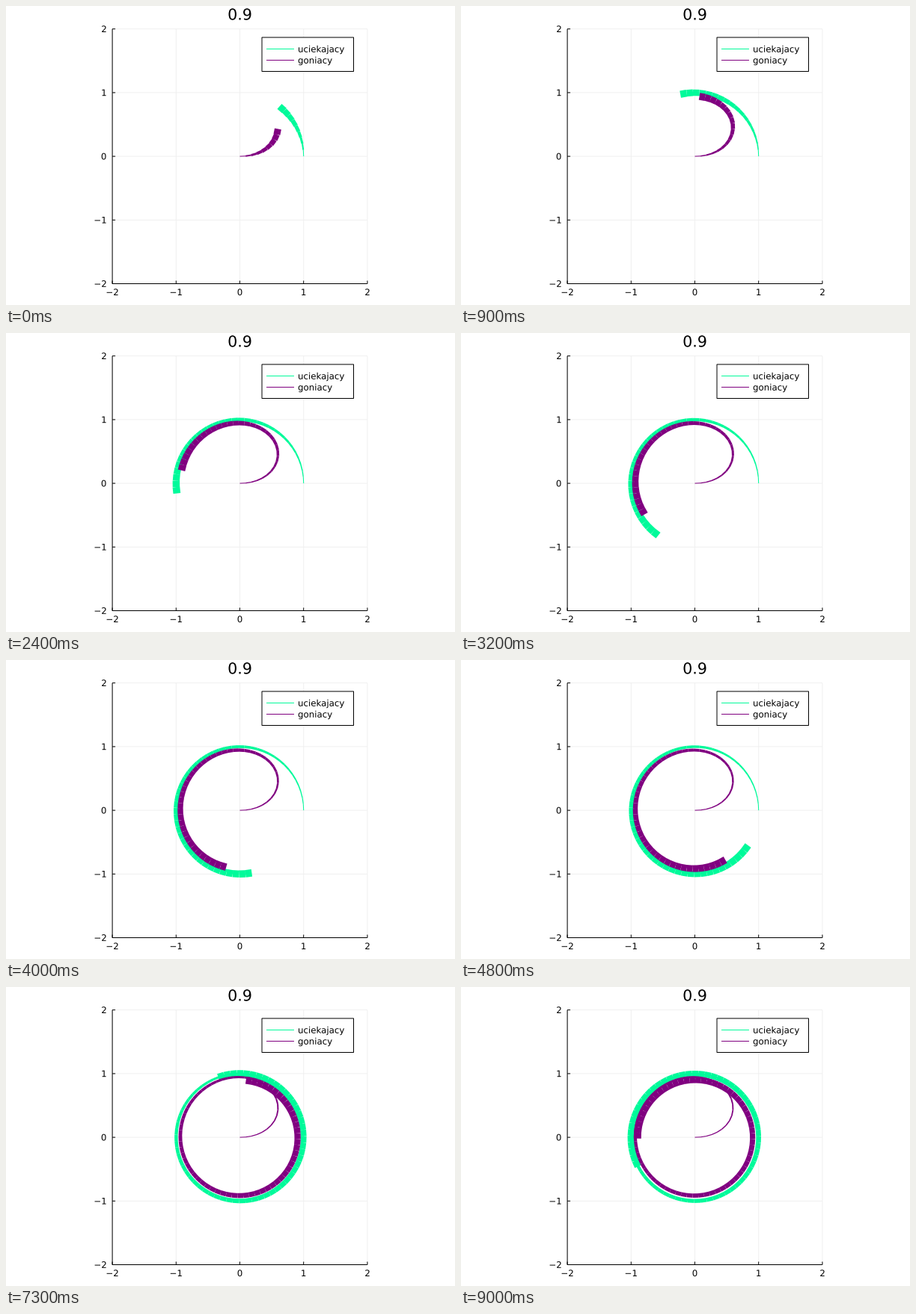
Animation, 600 px wide and 400 px high, one loop 9.1 s. Source, as a matplotlib script:

```python
import numpy as np
import matplotlib.pyplot as plt
from matplotlib.animation import FuncAnimation
from matplotlib.collections import LineCollection
from matplotlib.patches import PathPatch, Rectangle
from matplotlib.textpath import TextPath
from matplotlib.transforms import Affine2D

plt.rcParams["font.family"] = "DejaVu Sans"

W, H, DPI = 600, 400, 100
PX = 72 / DPI                      # points per pixel
CX, CY, UNIT = 312.5, 201.1, 85.2  # plot origin and scale in pixels
GREEN, PURPLE = "#00fa9a", "#800080"
SPEED, DT, SUB = 0.9, 0.1, 10
FRAMES, FIRST = 91, 10
MIN_WIDTH, MAX_WIDTH = 1, 10


def to_px(p):
    return np.column_stack((CX + UNIT * p[:, 0], CY - UNIT * p[:, 1]))


def runner(t):
    return np.array([np.cos(t), np.sin(t)])


def pursue(n):
    """Positions of a chaser that always heads for the runner."""
    pos, h = np.zeros(2), DT / SUB
    path = [pos]
    for i in range((n - 1) * SUB):
        gap = runner(i * h) - pos
        pos = pos + SPEED * h * gap / np.hypot(*gap)
        if (i + 1) % SUB == 0:
            path.append(pos)
    return np.array(path)


count = FRAMES + FIRST - 1
prey = to_px(runner(DT * np.arange(count)).T)
chaser = to_px(pursue(count))

fig = plt.figure(figsize=(W / DPI, H / DPI), dpi=DPI, facecolor="white")
ax = fig.add_axes([0, 0, 1, 1])
ax.set_xlim(0, W)
ax.set_ylim(H, 0)
ax.axis("off")


def line(x, y, color="black", z=3):
    ax.plot(x, y, color=color, lw=PX, zorder=z, solid_capstyle="butt",
            snap=False)


def label(x, y, s, size=11.8, align="left"):
    """Text as outlines, so that it keeps its subpixel position."""
    path = TextPath((0, 0), s, size=size)
    box = path.get_extents()
    shift = {"left": 0, "center": (box.x0 + box.x1) / 2, "right": box.x1}
    place = Affine2D().scale(1, -1).translate(x - shift[align], y)
    ax.add_patch(PathPatch(place.transform_path(path), fc="black", lw=0,
                           zorder=6, snap=False))


left, right = CX - 2 * UNIT, CX + 2 * UNIT
top, bottom = CY - 2 * UNIT, CY + 2 * UNIT
for v in range(-2, 3):
    x, y = CX + v * UNIT, CY - v * UNIT
    text = str(v).replace("-", "\u2212")
    line([x, x], [top, bottom], "#f0f0f0", 1)
    line([left, right], [y, y], "#f0f0f0", 1)
    line([x, x], [bottom, bottom - 4])
    line([left, left + 4], [y, y])
    label(x, 387, text, align="center")
    label(133.6, y + 4.3, text, align="right")
line([left, left], [top, bottom])
line([left, right], [bottom, bottom])
label(CX, 18.5, "0.9", 20.6, "center")

ax.add_patch(Rectangle((342, 42), 122.5, 45.5, fc="white", ec="black",
                       lw=PX, zorder=5, snap=False))
for y, color, name in ((57.5, GREEN, "uciekajacy"), (72.5, PURPLE, "goniacy")):
    line([348, 385], [y, y], color, 6)
    label(390, y + 4.3, name)


def trail(color):
    return ax.add_collection(
        LineCollection([], colors=color, capstyle="butt", zorder=4),
        autolim=False)


trails = [(trail(GREEN), prey), (trail(PURPLE), chaser)]


def update(frame):
    n = frame + FIRST
    widths = np.linspace(MIN_WIDTH, MAX_WIDTH, n)[:-1] * PX
    for coll, path in trails:
        coll.set_segments(np.stack((path[:n - 1], path[1:n]), axis=1))
        coll.set_linewidths(widths)
    return [coll for coll, _ in trails]


anim = FuncAnimation(fig, update, frames=FRAMES, interval=100,
                     repeat=True, repeat_delay=0)
plt.show()
```
